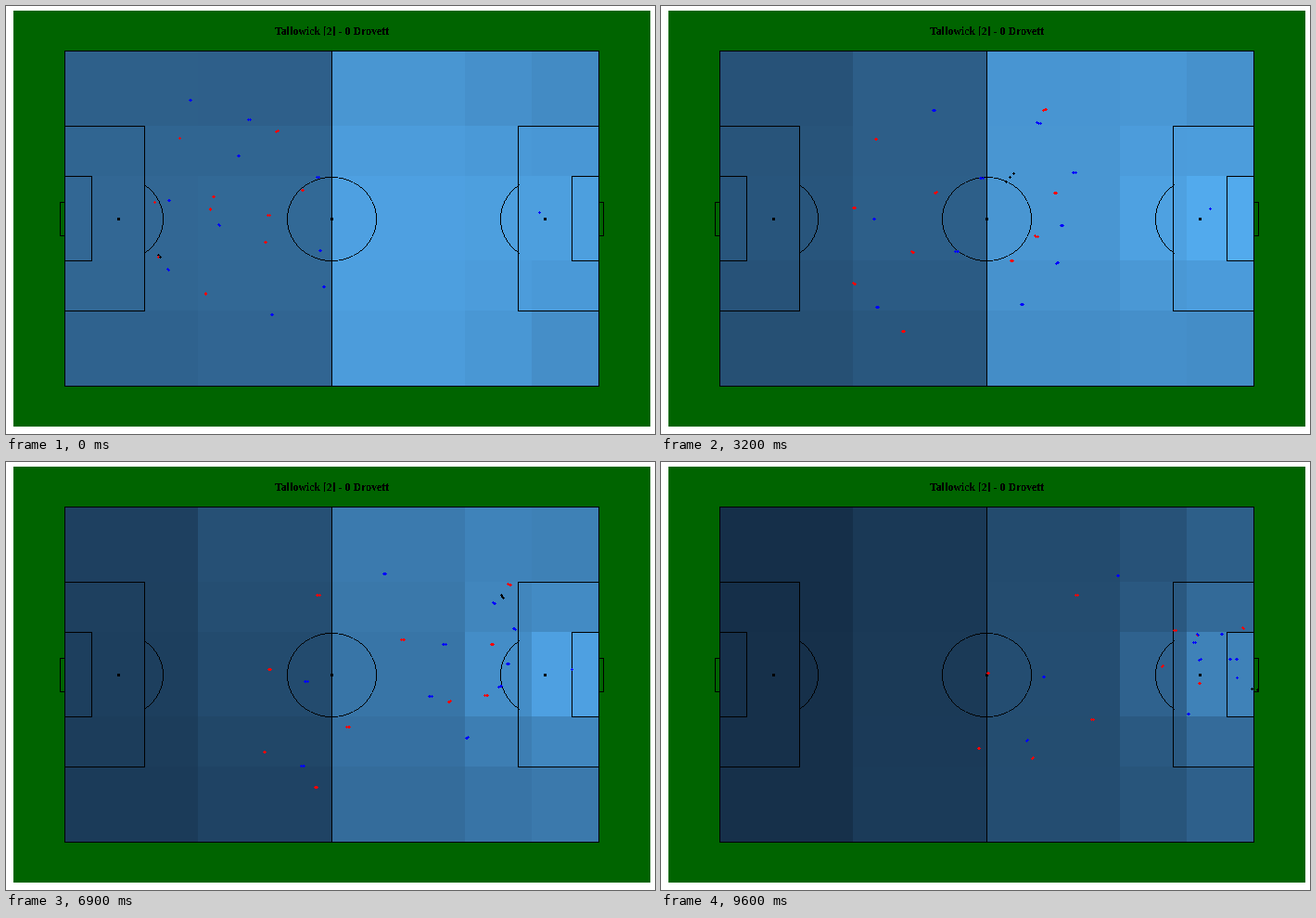
These frames come from a looping animation (700x461 px, 10000 ms). A matplotlib script:

```python
import numpy as np
import matplotlib.pyplot as plt
from matplotlib.animation import FuncAnimation
from matplotlib.colors import LinearSegmentedColormap, to_rgba
from matplotlib.patches import Rectangle

W, H, DPI = 700, 461, 100
PX = 72 / DPI
FRAMES, LAST = 100, 96

# Players run smoothly through three points: kick-off of the move, halfway, end
home = np.array([
    [(187, 142), (270, 143), (449, 143)],
    [(291, 135), (471, 114), (628, 179)],
    [(319, 198), (471, 200), (579, 186)],
    [(223, 205), (347, 197), (555, 181)],
    [(220, 218), (308, 278), (466, 277)],
    [(282, 225), (457, 252), (581, 238)],
    [(279, 254), (423, 272), (541, 219)],
    [(160, 211), (238, 220), (353, 227)],
    [(164, 270), (236, 307), (343, 308)],
    [(215, 309), (290, 356), (401, 318)],
])
away = np.array([
    [(198, 101), (343, 116), (493, 122)],
    [(261, 122), (465, 134), (579, 186)],
    [(250, 161), (398, 192), (576, 194)],
    [(335, 184), (493, 178), (605, 185)],
    [(175, 209), (266, 234), (413, 231)],
    [(229, 235), (374, 265), (582, 212)],
    [(338, 263), (479, 226), (621, 212)],
    [(342, 302), (472, 262), (614, 212)],
    [(174, 283), (268, 331), (395, 299)],
    [(286, 332), (437, 312), (569, 271)],
    [(575, 222), (600, 219), (621, 232)],
])
squads = np.vstack([home, away])

# Ball: (step, x, y) at every touch
touches = np.array([
    (0, 164, 268), (12, 228, 328), (19, 251, 339), (37, 424, 125), (57, 508, 104),
    (75, 548, 165), (84, 608, 181), (92, 586, 232), (96, 643, 245)])


def players(t):
    u = t / LAST
    start, mid, end = squads.transpose(1, 0, 2)
    return (start * (1 - u) * (1 - 2 * u) + mid * 4 * u * (1 - u)
            + end * u * (2 * u - 1))


def ball(t):
    return np.array([np.interp(t, touches[:, 0], touches[:, c]) for c in (1, 2)])


def heat(t):
    """Zone values, 5 rows by 5 columns, led by time and the ball."""
    u = t / LAST
    # The ball crosses halfway, reaches the wing, cuts inside, enters the box
    push = np.interp(t, [29, 30, 36, 37], [0, .5, .5, 1])
    fade = np.interp(t, [37, 72, 73, 77, 78, 96], [0, .06, .12, .14, .24, .36])

    build = np.array([.88, .87, .87]) + .0032 * min(t, 37)
    attack = np.array([.63, .80, .92]) - fade * np.array([1, 1, .7])
    right = build + push * (attack - build)
    left = [.48 - .44 * u, .49 - .37 * u**1.4]
    centre = np.concatenate([left, right])

    calm, sharp = np.array([.05, .08, .13]), np.array([.01, .12, .25])
    drop = np.concatenate([[.05 * (1 - u)] * 2, calm + push * (sharp - calm)])
    inner = .35 + .3 * push
    edge = np.array([1, inner, 0, inner, 1])

    # Rows on the ball's side are warmer
    lean = .07 * (229 - ball(t)[1]) / 115 * np.linspace(1, -1, 5)
    return centre - np.outer(edge, drop) + np.outer(lean, [.4, 1, 1, 1, .5])


fig = plt.figure(figsize=(W / DPI, H / DPI), dpi=DPI, facecolor="white")
ax = fig.add_axes([0, 0, 1, 1])
# Whole numbers fall on pixel centres
ax.set(xlim=(-.5, W - .5), ylim=(H - .5, -.5))
ax.axis("off")

ax.add_patch(Rectangle((7.5, 4.5), 687, 448, fc="#006400", lw=0, aa=False))
ax.text(350.5, 27.5, "Tallowick [2] - 0 Drovett", family="Liberation Serif",
        weight="bold", size=11.7 * PX, ha="center", va="center",
        antialiased=False)

ramp = LinearSegmentedColormap.from_list("ramp", ["#132B43", "#336A98", "#56B1F7"])
zones = ax.pcolormesh(np.array([63, 207, 351, 495, 567, 639]) - .5,
                      np.array([48, 129, 183, 274, 328, 409]) - .5,
                      heat(0), cmap=ramp, vmin=0, vmax=1, zorder=1)


def box(x0, y0, x1, y1):
    # The small shift makes snapping pick the intended pixel
    ax.add_patch(Rectangle((x0 - .25, y0 - .25), x1 - x0, y1 - y0, fill=False,
                           ec="black", lw=PX, aa=False, snap=True, zorder=2))


def stamp(points, marker, size, z=2):
    x, y = np.transpose(points)
    return ax.scatter(x, y, marker=marker, s=(size * PX)**2, c=["black"] * len(x),
                      linewidths=0, antialiased=False, snap=False, zorder=z)


def arc(x, facing=0, spread=np.pi):
    """One-pixel curve: keep only samples close to a pixel centre."""
    a = facing + np.linspace(-spread, spread, 6000)
    p = np.column_stack([x + 48 * np.cos(a), 229 + 45 * np.sin(a)])
    q = np.round(p)
    stamp(np.unique(q[np.abs(p - q).sum(axis=1) < .5], axis=0), "s", .9)


box(63, 48, 639, 409)
box(63, 48, 351, 409)
for near, area, small, goal in ((63, 149, 92, 58), (639, 552, 610, 644)):
    box(min(near, area), 129, max(near, area), 328)
    box(min(near, small), 183, max(near, small), 274)
    box(min(near, goal), 211, max(near, goal), 247)
arc(351)
arc(121, 0, np.arccos(28 / 48))
arc(581, np.pi, np.arccos(28 / 48))
stamp([(121, 229), (351, 229), (581, 229)], "o", 2.9)

STREAK = (-.4, 0, .4)
kits = ["red"] * len(home) + ["blue"] * len(away) + ["black"]
dots = stamp(np.zeros((len(kits) * len(STREAK), 2)), "P", 2.9, z=3)
dots.set_facecolors([to_rgba(c) for c in kits * len(STREAK)])


def draw(frame):
    t = min(frame, LAST)
    zones.set_array(heat(t))
    steps = np.clip(np.add(t, STREAK), 0, LAST)
    dots.set_offsets(np.round(np.vstack([[*players(s), ball(s)] for s in steps])))
    return zones, dots


anim = FuncAnimation(fig, draw, frames=FRAMES, interval=100, repeat=True,
                     repeat_delay=0, blit=False)
plt.show()
```
